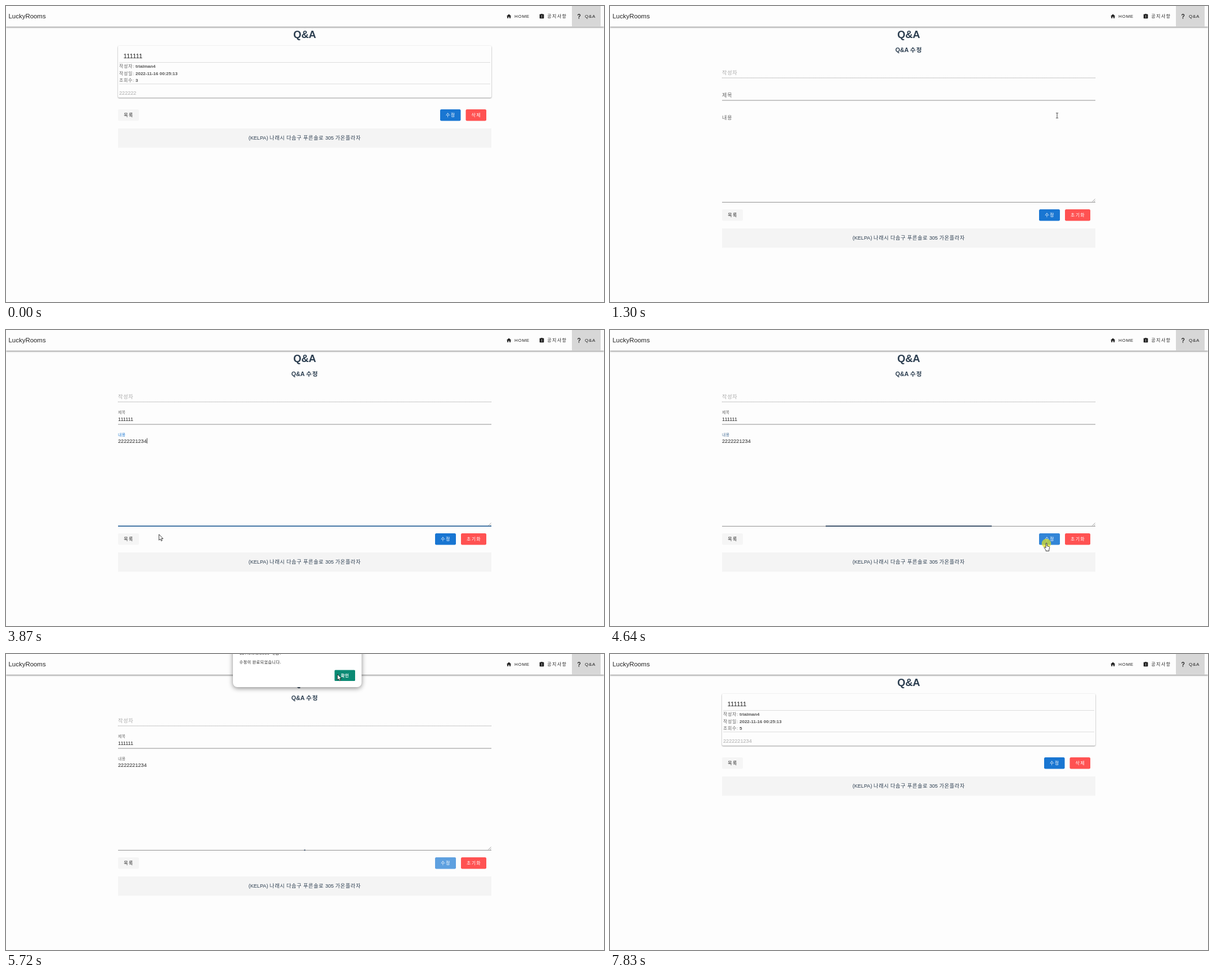
Write an HTML page that moves like this. It is 1062x527 px and loops after 8290 ms.

```html
<!DOCTYPE html>
<html lang="ko">
<head>
<meta charset="utf-8">
<title>Q&amp;A</title>
<style>
html, body { margin: 0; width: 100%; height: 100%; overflow: hidden; background: #fdfdfd; }
svg { display: block; width: 1062px; height: 527px; }
text { font-family: 'Liberation Sans', 'Noto Sans CJK KR', sans-serif; font-kerning: normal; white-space: pre; }
.card { filter: drop-shadow(0 1px 1px #0006); }
.bar { filter: drop-shadow(0 1.5px 1.5px #0008); }
.alert { filter: drop-shadow(0 2px 4px #0007); }
</style>
</head>
<body>
<svg id="stage" viewBox="0 0 1062 527"></svg>
<script>
const LOOP = 8290, SIZE = 9.15, DIGIT = SIZE * .556;
const BLUE = '#1976d2', RED = '#ff5252', INK = '#2c3e50', GREY = '#666';
const stage = document.getElementById('stage');
const $ = id => document.getElementById(id);

// Hangul runs get extra tracking so that each syllable fills one em.
const track = (s, ls) => s.replace(/&/g, '&amp;').replace(/[가-힣]+/g,
  run => `<tspan letter-spacing="${(ls + .08).toFixed(3)}em">${run}</tspan>`);
const text = (x, y, size, s, { fill = '#222', weight = 400, anchor = 'start', ls = 0, id = '' } = {}) =>
  `<text id="${id}" x="${x}" y="${y}" font-size="${size}" fill="${fill}" font-weight="${weight}"
    text-anchor="${anchor}" letter-spacing="${ls}em">${track(s, ls)}</text>`;
const rect = (x, y, w, h, fill, extra = '') =>
  `<rect x="${x}" y="${y}" width="${w}" height="${h}" fill="${fill}" ${extra}/>`;
const line = (y, color, x1 = 199, x2 = 862, extra = '') =>
  `<path d="M${x1} ${y}H${x2}" stroke="${color}" ${extra}/>`;
const icon = (x, d) => `<path transform="translate(${x} 13.2) scale(.429)" fill="#222" d="${d}"/>`;
const button = (x, y, w, fill, label, color = '#fff', id = '') =>
  rect(x, y, w, 20.6, fill, 'rx="2.3"') +
  (id && rect(x, y, w, 20.6, '#fff', `rx="2.3" id="${id}" opacity="0"`)) +
  text(x + w / 2 + .5, y + 13.3, 8, label, { fill: color, weight: 500, anchor: 'middle', ls: .089 });
const group = (id, body, extra = '') => `<g id="${id}" ${extra}>${body}</g>`;

const nav = rect(0, -5, 1062, 41.8, '#fdfdfd', 'class="bar"') +
  text(4.5, 22.2, 11.44, 'LuckyRooms') +
  rect(1005, 0, 51, 36.6, '#d7d7d7') +
  icon(888, 'M10 20V14H14V20H19V12H22L12 3 2 12H5V20Z') +
  icon(946.3, 'M19 3H14.8C14 .5 10 .5 9.2 3H5A2 2 0 0 0 3 5V19A2 2 0 0 0 5 21H19A2 2 0 0 0 21 19V5A2 2 0 0 0 19 3M13 18H11V16H13ZM13 14H11V8H13Z') +
  icon(1012.5, 'M10 19H13V22H10ZM12 2C17.4 2.2 19.7 7.6 16.5 11.7 15.7 12.7 14.3 13.3 13.7 14.2 13 15 13 16 13 17H10C10 15.3 10 13.9 10.7 12.9 11.3 11.9 12.7 11.3 13.5 10.7 15.9 8.4 15.3 5.3 12 5A3 3 0 0 0 9 8H6A6 6 0 0 1 12 2Z') +
  text(903, 21.3, 8, 'HOME', { ls: .089 }) +
  text(961.3, 21.3, 8, '공지사항', { ls: .089 }) +
  text(1028, 21.3, 8, 'Q&A', { ls: .089 });

const meta = (y, label, value, id) =>
  text(201, y, 8, label + ': ', { fill: GREY }) +
  text(230, y, 8, value, { fill: '#555', weight: 700, id });

const card = rect(199, 70.7, 663, 92.3, '#fdfdfd', 'rx="2" class="card"') +
  text(208.5, 93, 11.44, '111111') +
  line(100.5, '#ddd', 201, 860) +
  meta(110, '작성자', 'trialman4') +
  meta(122.8, '작성일', '2022-11-16 00:25:13') +
  meta(135.3, '조회수', '3', 'views') +
  line(138.8, '#ddd', 201, 860) +
  text(201, 157.6, SIZE, '', { fill: '#aaa', id: 'body' }) +
  button(771, 184, 36.5, BLUE, '수정', '#fff', 'glow0') +
  button(816.5, 184, 36.5, RED, '삭제');

const form = text(530.5, 81.8, 10.7, 'Q&A 수정', { fill: INK, weight: 700, anchor: 'middle' }) +
  text(199, 121.5, SIZE, '작성자', { fill: '#aaa' }) +
  line(128, '#8a8a8a', 199, 862, 'stroke-dasharray="1.1 1.1"') +
  line(168, '#8f8f8f') + line(349.4, '#8f8f8f') +
  text(0, 0, SIZE, '제목', { fill: GREY, id: 'label0' }) +
  text(0, 0, SIZE, '내용', { fill: GREY, id: 'label1' }) +
  group('values', text(199, 161.5, SIZE, '111111') + text(199, 200.6, SIZE, '', { id: 'typed' })) +
  rect(0, 192.5, .8, 9.5, '#222', 'id="caret"') +
  rect(0, 348.4, 0, 1.6, '#1c5a94', 'id="focus"') +
  '<path d="M856.5 348.5l5-5M859.5 348.5l2-2" stroke="#777" stroke-width=".7"/>' +
  button(762, 362, 37, BLUE, '수정', '#fff', 'glow1') +
  button(808, 362, 45, RED, '초기화');

const foot = button(199, 184, 37, '#f5f5f5', '목록', '#222') +
  rect(199, 218, 663, 34.4, '#f4f4f4') +
  text(530.5, 238.3, SIZE, '(KELPA) 나래시 다솜구 푸른솔로 305 가온플라자', { anchor: 'middle', fill: INK });

const dialog = rect(403, -30, 228.5, 89, '#fff', 'rx="8" class="alert"') +
  text(414.5, 1, 8, '127.0.0.1:8080 내용:') +
  text(414.5, 16.8, 7, '수정이 완료되었습니다.') +
  rect(583.5, 28.5, 36.5, 19.5, '#0b8a74', 'rx="1.5"') +
  text(602, 41, 7.3, '확인', { fill: '#fff', weight: 700, anchor: 'middle' });

const pointer = group('pointer',
  '<circle id="press" r="8.3" fill="#e3e31c" opacity=".7"/>' +
  '<path id="arrow" d="M0 0V10.3L2.4 8.2 4 11.7 5.7 11 4.2 7.6H7.3Z" fill="#fff" stroke="#111" stroke-width=".8"/>' +
  '<path id="beam" d="M-2-4.5H-.6L0-4 .6-4.5H2M-2 4.5H-.6L0 4 .6 4.5H2M0-4V4" fill="none" stroke="#333" stroke-width=".9"/>' +
  '<path id="hand" d="M-1 0Q0-1.3 1 0V4.5L4.8 5.6Q6 6 5.7 7.6L4.7 11V13.5H-1V11.6L-4 7.6Q-3.6 6-2.2 6.7L-1 8Z" fill="#fff" stroke="#111" stroke-width=".8"/>');

stage.innerHTML = text(530.5, 56.6, 18.3, 'Q&A', { fill: INK, weight: 700, anchor: 'middle' }) +
  nav + group('card', card) + group('form', form) + group('foot', foot) +
  group('dialog', dialog) + pointer;

// Pointer route: time, x, y
const route = [
  [200, 966, 484], [480, 850, 330], [700, 742, 230], [830, 776, 184], [950, 794, 195],
  [1400, 794, 195], [1930, 398, 217], [2050, 325.5, 220.5], [2660, 325.5, 220.5],
  [2850, 213, 362], [3800, 213, 362], [4480, 775, 380], [4780, 775, 380],
  [5460, 588.5, 36], [6300, 588.5, 36], [6660, 446.5, 141.5], [6880, 230, 158],
  [7140, 487, 283], [7200, 487, 283], [7800, 1020, 522]
];
const presses = [[950, 1090], [2250, 2400], [4560, 4780], [5530, 5660]];

const part = (t, from, span) => Math.min(1, Math.max(0, (t - from) / span));
const easeOut = p => 1 - (1 - p) ** 3;
const show = (id, on) => $(id).style.display = on ? '' : 'none';
const inside = (x, y, x1, y1, x2, y2) => x >= x1 && x <= x2 && y >= y1 && y <= y2;

function locate(t) {
  const i = route.findIndex(k => k[0] > t);
  if (i < 0) return route.at(-1).slice(1);
  if (!i) return route[0].slice(1);
  const [a, b] = [route[i - 1], route[i]], p = part(t, a[0], b[0] - a[0]);
  return [1, 2].map(n => a[n] + (b[n] - a[n]) * p);
}

function shape(x, y, editing, alerting) {
  if (alerting) return 'arrow';
  const over = (x1, x2) => inside(x, y, x1, editing ? 362 : 184, x2, editing ? 382.6 : 204.6);
  if (over(199, 236) || (editing ? over(762, 799) || over(808, 853) : over(771, 807.5) || over(816.5, 853))) return 'hand';
  return editing && inside(x, y, 199, 140, 862, 349) ? 'beam' : 'arrow';
}

function draw(t) {
  const editing = t >= 1090 && t < 5850, alerting = t >= 4780 && t < 5790;
  const saved = t >= 5850;
  show('card', !editing);
  show('form', editing);
  show('dialog', alerting);
  $('foot').setAttribute('transform', `translate(0 ${editing ? 178 : 0})`);
  $('views').textContent = saved ? 5 : 3;
  $('body').textContent = saved ? '2222221234' : '222222';

  // Form fields
  const lift = easeOut(part(t, 1360, 300));
  [161.5, 201.5].forEach((y, i) => $('label' + i).setAttribute('transform',
    `translate(199 ${y - 12.8 * lift}) scale(${1 - .25 * lift})`));
  show('values', t >= 1360);
  const count = [3330, 3460, 3600, 3800].filter(k => t >= k).length;
  const entry = '222222' + '1234'.slice(0, count);
  $('typed').textContent = entry;
  $('caret').setAttribute('x', 199.3 + entry.length * DIGIT);
  show('caret', t >= 2250 && t < 4570);

  // The underline stalls just before closing while the alert blocks the page.
  const blur = easeOut(part(t, 4570, 300));
  const active = t < 4570 ? easeOut(part(t, 2240, 300)) : Math.max(t < 5790 ? .003 : 0, 1 - blur);
  $('focus').setAttribute('x', 530.5 - 331.5 * active);
  $('focus').setAttribute('width', 663 * active);
  $('focus').setAttribute('fill', t < 4570 ? '#1c5a94' : '#17304e');
  $('label1').setAttribute('fill', `color-mix(in srgb, ${BLUE} ${active * 100}%, ${GREY})`);

  // Pointer and button highlights
  const [x, y] = locate(t), kind = shape(x, y, editing, alerting);
  show('pointer', t >= 200 && t < 7830);
  $('pointer').setAttribute('transform', `translate(${x} ${y})`);
  ['arrow', 'beam', 'hand'].forEach(id => show(id, id === kind));
  show('press', presses.some(([a, b]) => t >= a && t < b));
  const hover = kind === 'hand' && x > 760 ? .08 : 0;
  $('glow0').setAttribute('opacity', hover + .15 * part(t, 950, 140) * (t < 1090));
  $('glow1').setAttribute('opacity', t < 4570 ? hover : .08 + .22 * part(t, 4620, 160));
}

function tick() {
  draw(performance.now() % LOOP);
  requestAnimationFrame(tick);
}
tick();
</script>
</body>
</html>
```
